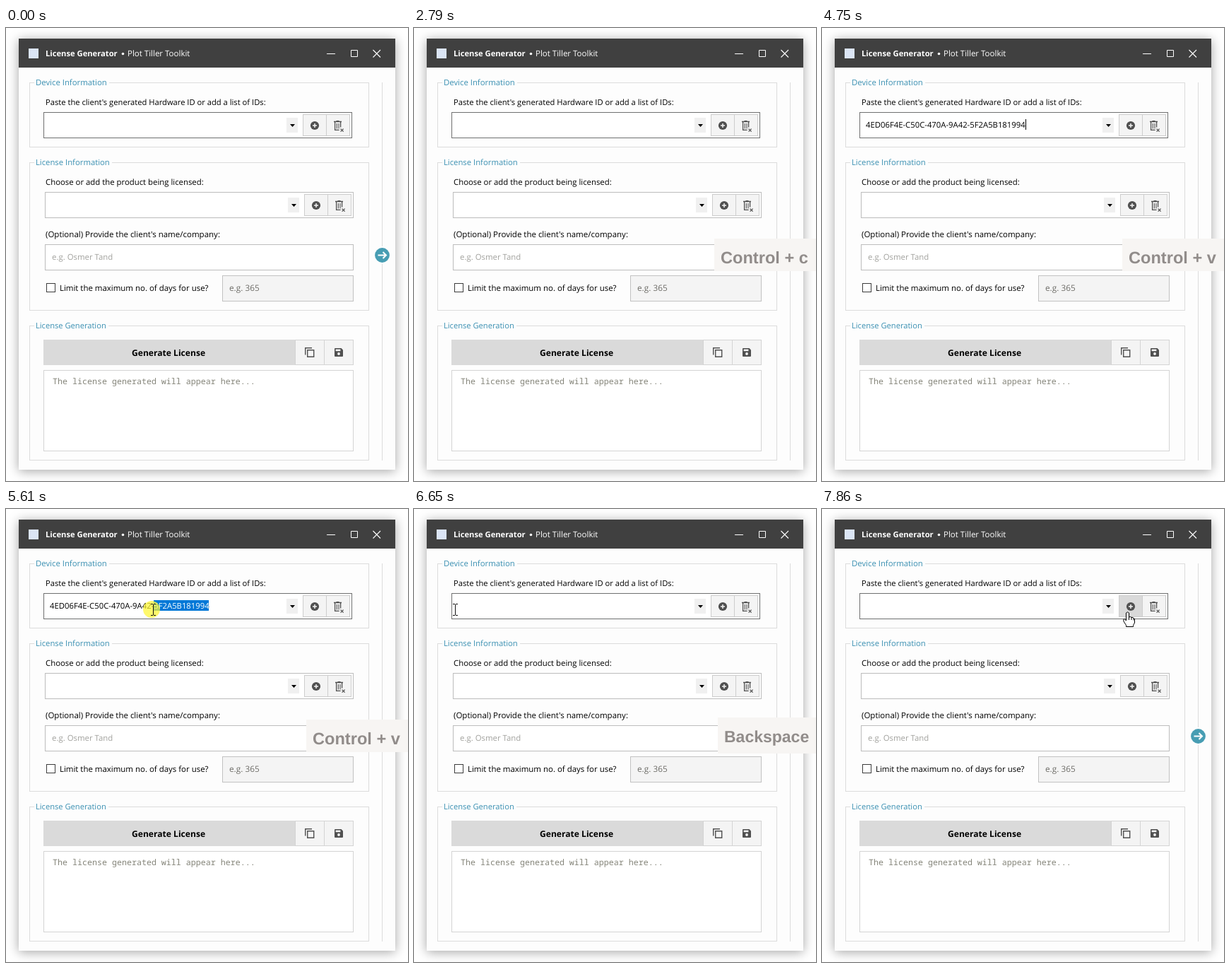
An HTML page with a canvas for the animation above (8000 ms loop, 569 by 641 pixels).

```html
<!DOCTYPE html>
<html lang="en">
<head>
<meta charset="utf-8">
<title>License Generator</title>
<style>
html, body { margin: 0; width: 100%; height: 100%; overflow: hidden; background: #fff; }
canvas { display: block; width: 569px; height: 641px; }
</style>
</head>
<body>
<canvas id="stage" width="569" height="641"></canvas>
<script>
const ctx = document.getElementById('stage').getContext('2d');
const LOOP = 8000;
const SANS = '"Open Sans", "Noto Sans", sans-serif';
const MONO = '"Noto Sans Mono", "DejaVu Sans Mono", monospace';
const BOLD = '"Liberation Sans", Arial, sans-serif';
const HARDWARE_ID = '4ED06F4E-C50C-470A-9A42-5F2A5B181994';
const ID_FONT = `11.3px ${SANS}`;
const ID_X = 62, ID_Y = 141;
const ICON = '#505050';

// ---- drawing helpers ----
function fill(x, y, w, h, color) {
  ctx.fillStyle = color;
  ctx.fillRect(x, y, w, h);
}

function frame(x, y, w, h, border, inside) {
  if (inside) fill(x, y, w, h, inside);
  ctx.strokeStyle = border;
  ctx.lineWidth = 1;
  ctx.strokeRect(x + 0.5, y + 0.5, w - 1, h - 1);
}

function text(str, x, y, size, color = '#000', weight = 400, family = SANS) {
  ctx.font = `${weight} ${size}px ${family}`;
  ctx.fillStyle = color;
  ctx.fillText(str, x, y);
}

function disc(x, y, r, color) {
  ctx.fillStyle = color;
  ctx.beginPath();
  ctx.arc(x, y, r, 0, Math.PI * 2);
  ctx.fill();
}

function stroke(path, color, width = 1) {
  ctx.strokeStyle = color;
  ctx.lineWidth = width;
  ctx.stroke(new Path2D(path));
}

function shape(path, color) {
  ctx.fillStyle = color;
  ctx.fill(new Path2D(path));
}

function at(x, y, draw) {
  ctx.save();
  ctx.translate(x, y);
  draw();
  ctx.restore();
}

// ---- window parts ----
function drawWindow() {
  fill(0, 0, 569, 641, '#fff');
  ctx.save();
  ctx.shadowColor = 'rgba(0,0,0,.36)';
  ctx.shadowBlur = 15;
  ctx.shadowOffsetY = 2;
  fill(18, 15, 533, 610, '#fdfdfd');
  ctx.restore();

  fill(18, 15, 533, 41, '#404040');
  fill(32, 29, 14, 14, '#dbe5f5');
  text('License Generator', 56, 40, 11.2, '#fff', 700);
  disc(165.5, 36.5, 1.8, '#fff');
  text('Plot Tiller Toolkit', 172, 40, 11.5, '#fff');
  stroke('M454 36.5h12 M488.5 31.5h9v9h-9z', '#fff');
  stroke('M519.5 31l10.5 10.5 M530 31l-10.5 10.5', '#fff', 1.1);
}

function group(y, h, title, gap, size) {
  frame(33, y, 481, h, '#dcdcdc');
  fill(40, y - 1, gap, 3, '#fdfdfd');
  text(title, 42, y + 4, size, '#3b90b2');
}

function plusIcon(x, y) {
  disc(x, y, 6.1, ICON);
  stroke(`M${x - 3} ${y}h6 M${x} ${y - 3}v6`, '#f4f4f4', 1.5);
}

function trashIcon() {
  stroke('M0 1.5h11 M3.5 .6h4', ICON, 1.3);
  stroke('M1.6 2v11.3h6 M9.6 2v7.6', ICON, 1.3);
  stroke('M4.3 4v7.5 M7 4v7.5', ICON, 1.1);
  stroke('M9.6 11.6l4 4 M13.6 11.6l-4 4', ICON, 1.3);
}

function combo(dx, dy, border, hover) {
  at(dx, dy, () => {
    frame(53, 119, 437, 37, border, '#fff');
    fill(397, 127, 16, 21, '#f0f0f0');
    shape('M402 136h7l-3.5 4z', '#000');
    frame(420, 122, 34, 31, '#cdcdcd', hover ? '#d9d9d9' : '#f4f4f4');
    frame(453, 122, 34, 31, '#cdcdcd', '#f4f4f4');
    plusIcon(437, 138);
    at(464, 131, trashIcon);
  });
}

function copyIcon() {
  stroke('M.7 10.5V.7H10', ICON, 1.4);
  stroke('M3.7 3.7h9v9.6h-9z', ICON, 1.4);
}

function saveIcon() {
  shape('M1 0h8.5l2.5 2.5V11a1 1 0 0 1-1 1H1a1 1 0 0 1-1-1V1a1 1 0 0 1 1-1z', ICON);
  fill(1.6, 1.6, 6.8, 2.6, '#f4f4f4');
  disc(6, 8, 1.9, '#f4f4f4');
}

function drawForm(hover) {
  group(77, 92, 'Device Information', 106, 11.36);
  text("Paste the client's generated Hardware ID or add a list of IDs:", 56, 109, 11.2);
  combo(0, 0, '#6f7070', hover);

  group(190, 210, 'License Information', 110, 11.3);
  text('Choose or add the product being licensed:', 56, 222, 11.36);
  combo(2, 113, '#bdbdbd', false);
  text("(Optional) Provide the client's name/company:", 56, 296, 11.5);
  frame(55, 306, 437, 37, '#bdbdbd', '#fff');
  text('e.g. Osmer Tand', 65, 328, 11.4, '#a2a29e');
  frame(57, 361, 13, 13, '#3c3c3c', '#fff');
  text('Limit the maximum no. of days for use?', 76, 372, 11.45);
  frame(306, 350, 186, 37, '#c2c2c2', '#f4f4f4');
  text('e.g. 365', 316, 372, 11.8, '#6e6d68');

  group(421, 191, 'License Generation', 105, 11.15);
  fill(53, 441, 357, 36, '#dadada');
  text('Generate License', 178, 464, 12.1, '#000', 700);
  frame(409, 441, 42, 36, '#d4d4d4', '#f4f4f4');
  frame(450, 441, 42, 36, '#d4d4d4', '#f4f4f4');
  at(423, 452, copyIcon);
  at(465, 453, saveIcon);
  frame(53, 484, 439, 115, '#d4d4d4', '#fff');
  text('The license generated will appear here...', 66, 504, 11.67, '#85857a', 400, MONO);

  fill(532, 77, 1, 535, '#dcdcdc');
  fill(530, 309, 5, 25, '#fdfdfd');
  disc(532.5, 321.5, 10.4, '#479db3');
  stroke('M526.5 321.5h11 M533.5 317l4.5 4.5l-4.5 4.5', '#fff', 2);
}

// ---- hardware ID field ----
function idOffset(count) {
  ctx.font = ID_FONT;
  return ID_X + ctx.measureText(HARDWARE_ID.slice(0, count)).width;
}

function charAtX(x) {
  let i = 0;
  while (i < HARDWARE_ID.length && (idOffset(i) + idOffset(i + 1)) / 2 < x) i++;
  return i;
}

function idText(color) {
  ctx.font = ID_FONT;
  ctx.fillStyle = color;
  ctx.fillText(HARDWARE_ID, ID_X, ID_Y);
}

function drawId(t, pointer) {
  const end = idOffset(HARDWARE_ID.length);
  if (t >= 3820 && t < 4390) fill(ID_X, 129, 1, 15, '#000');
  if (t < 4670 || t >= 6550) return;
  idText('#000');
  if (t < 5220) fill(Math.round(end), 129, 1, 15, '#000');
  if (t < 5510) return;
  const start = idOffset(charAtX(pointer.x + 2));
  if (end - start < 1) return;
  ctx.save();
  ctx.beginPath();
  ctx.rect(Math.round(start), 129, Math.round(end - start), 15);
  ctx.clip();
  fill(start - 1, 129, end - start + 2, 15, '#0078d7');
  idText('#fff');
  ctx.restore();
}

// ---- pointer ----
const smooth = p => p * p * (3 - 2 * p);
const easeOut = p => 1 - Math.pow(1 - p, 1.25);

// Pointer moves: visible from start to end, advancing in `steps` jumps of `gap` ms
const MOVES = [
  { start: 190, end: 550, gap: 90, steps: 3, from: [419, 361], to: [296, 617], ease: smooth },
  { start: 3070, end: 4670, gap: 93.75, steps: 8, from: [297, 616], to: [300, 142], ease: smooth },
  { start: 4950, end: 5510, gap: 90, steps: 2, from: [307, 139], to: [289, 139], ease: smooth },
  { start: 5510, end: 6643, gap: 96, steps: 4, from: [289, 142], to: [13, 143], ease: easeOut },
  { start: 6643, end: LOOP, gap: 93.6, steps: 13, from: [56, 142], to: [433, 146], ease: smooth }
];

function pointerAt(t) {
  const m = MOVES.find(m => t >= m.start && t < m.end);
  if (!m) return null;
  const k = Math.min(m.steps, Math.floor((t - m.start + 1) / m.gap));
  const p = m.ease(k / m.steps);
  const [x, y] = m.from.map((v, i) => Math.round(v + (m.to[i] - v) * p));
  return { x, y };
}

const inside = (p, x0, y0, x1, y1) => p.x >= x0 && p.x < x1 && p.y >= y0 && p.y < y1;
const overAdd = p => inside(p, 420, 122, 454, 153);

function pointerKind(p, dragging) {
  if (dragging) return 'beam';
  if (overAdd(p) || inside(p, 53, 441, 492, 477)) return 'hand';
  const fields = [[53, 119, 397, 156], [55, 232, 399, 269], [55, 306, 492, 343], [53, 484, 492, 599]];
  return fields.some(f => inside(p, ...f)) ? 'beam' : 'arrow';
}

const POINTERS = {
  beam() {
    stroke('M-1 -7.5h3 M3 -7.5h3 M-1 8.5h3 M3 8.5h3 M2.5 -7v15', '#111');
  },
  arrow() {
    const path = 'M.5 .5v16l3.7-3.6l2.6 5.8l2.4-1l-2.6-5.7h5z';
    shape(path, '#fff');
    stroke(path, '#000');
  },
  hand() {
    const path = 'M-2.5 1Q-.5-1.5 1.5 1V7Q4 5.5 5 7.5Q7.5 6.5 8 9Q10 8.5 9.5 11V15L7.5 18.5V20.5H-2.5V18.5L-6 13Q-7 9.5-5 9.5L-2.5 12z';
    shape(path, '#fff');
    stroke(path, '#000');
    stroke('M1.5 7v4 M4.9 7.5v3.5 M8 9v2.5', '#000');
  }
};

function drawPointer(t, p) {
  const dragging = t >= 5510 && t < 6080;
  if (dragging || (t >= 3820 && t < 3920)) disc(p.x, p.y, 12, 'rgba(255,247,50,.72)');
  at(p.x, p.y, POINTERS[pointerKind(p, dragging)]);
}

// ---- key press captions ----
const KEYS = [
  { start: 2790, end: 3725, label: 'Control + c', x: 425, y: 298, h: 46, base: 333, size: 23.6 },
  { start: 4670, end: 5700, label: 'Control + v', x: 425, y: 298, h: 46, base: 333, size: 23.6 },
  { start: 6550, end: 7575, label: 'Backspace', x: 430, y: 295, h: 51, base: 330, size: 23 }
];

function drawKey(t) {
  const key = KEYS.find(k => t >= k.start && t < k.end);
  if (!key) return;
  fill(key.x, key.y, 569 - key.x, key.h, '#f7f5f3');
  text(key.label, key.x + 9, key.base, key.size, '#918c8a', 700, BOLD);
}

function render(t) {
  ctx.textRendering = 'geometricPrecision';
  const pointer = pointerAt(t);
  drawWindow();
  drawForm(pointer !== null && overAdd(pointer));
  drawId(t, pointer);
  drawKey(t);
  if (pointer) drawPointer(t, pointer);
}

function tick() {
  render(performance.now() % LOOP);
  requestAnimationFrame(tick);
}
tick();
</script>
</body>
</html>
```
